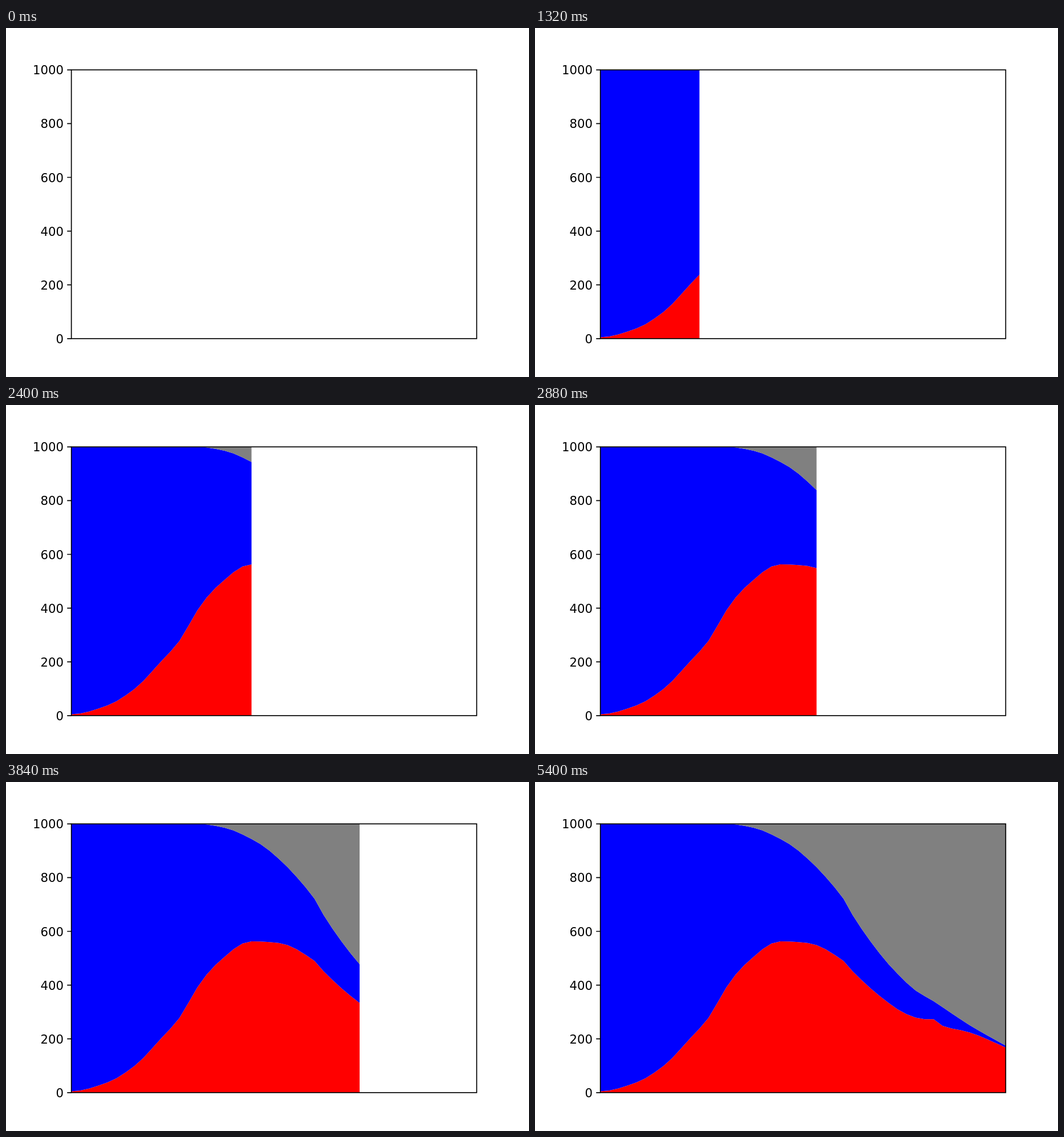
Write an HTML page with a canvas that moves like this. It is 917 px wide and 611 px high and loops after 6720 ms.

```html
<!DOCTYPE html>
<html lang="en">
<head>
<meta charset="utf-8">
<title>Stacked area chart</title>
<style>
  html, body { margin: 0; width: 100%; height: 100%; overflow: hidden; background: #fff; }
  canvas { display: block; }
</style>
</head>
<body>
<canvas id="chart" width="917" height="611"></canvas>
<script>
const canvas = document.getElementById('chart');
const ctx = canvas.getContext('2d');

const LOOP = 6720, STEP = 120, LAST = 45, TOTAL = 1000;
const plot = {
  left: canvas.width * 0.125, right: canvas.width * 0.9,
  top: canvas.height * 0.12, bottom: canvas.height * 0.89
};

const xAt = step => plot.left + (plot.right - plot.left) * step / LAST;
const yAt = value => plot.bottom - (plot.bottom - plot.top) * value / TOTAL;

// Monotone cubic curve through [step, value] keys, starting level.
function curve(keys) {
  const end = keys.length - 1;
  const rise = k => (keys[k + 1][1] - keys[k][1]) / (keys[k + 1][0] - keys[k][0]);
  const slope = k => {
    const before = k > 0 ? rise(k - 1) : 0;
    const after = k < end ? rise(k) : before;
    return before * after > 0 ? 2 * before * after / (before + after) : 0;
  };
  return step => {
    let k = 0;
    while (k < end - 1 && step > keys[k + 1][0]) k++;
    const [x0, y0] = keys[k], [x1, y1] = keys[k + 1];
    const width = x1 - x0, t = (step - x0) / width, u = 1 - t;
    return y0 * u * u * (1 + 2 * t) + y1 * t * t * (1 + 2 * u)
      + width * t * u * (slope(k) * u - slope(k + 1) * t);
  };
}

const floor = () => 0;
const ceiling = () => TOTAL;
const redTop = curve([
  [0, 5], [4, 38], [7, 99], [10, 203], [12, 278], [14, 392], [16, 475],
  [20, 563], [23, 557], [27, 490], [28, 452], [31, 360], [34, 292],
  [36, 273], [37, 273], [38, 248], [41, 224], [45, 168]
]);
const blueTop = curve([
  [0, 1000], [14, 1000], [17, 986], [20, 944], [22, 900], [27, 721], [28, 661],
  [31, 518], [33, 442], [35, 380], [37, 340], [41, 251], [45, 175]
]);

function fillBand(lower, upper, count, color) {
  ctx.beginPath();
  for (let i = 0; i <= count; i++) ctx.lineTo(xAt(i), yAt(lower(i)));
  for (let i = count; i >= 0; i--) ctx.lineTo(xAt(i), yAt(upper(i)));
  ctx.fillStyle = color;
  ctx.fill();
}

function drawAxes() {
  ctx.strokeStyle = ctx.fillStyle = '#000';
  ctx.lineWidth = 1.7;
  ctx.font = '21.22px "DejaVu Sans", sans-serif';
  ctx.textAlign = 'right';
  ctx.strokeRect(plot.left, plot.top, plot.right - plot.left, plot.bottom - plot.top);
  ctx.beginPath();
  for (let value = 0; value <= TOTAL; value += 200) {
    const y = yAt(value);
    ctx.moveTo(plot.left, y);
    ctx.lineTo(plot.left - 7.4, y);
    ctx.fillText(value, 101, y + 8.06);
  }
  ctx.stroke();
}

function draw(time) {
  const count = Math.min(LAST, Math.floor(time % LOOP / STEP));
  ctx.fillStyle = '#fff';
  ctx.fillRect(0, 0, canvas.width, canvas.height);
  if (count > 0) {
    fillBand(floor, redTop, count, '#f00');
    fillBand(redTop, blueTop, count, '#00f');
    fillBand(blueTop, ceiling, count, '#808080');
  }
  drawAxes();
}

function tick() {
  draw(performance.now());
  requestAnimationFrame(tick);
}
tick();
</script>
</body>
</html>
```
